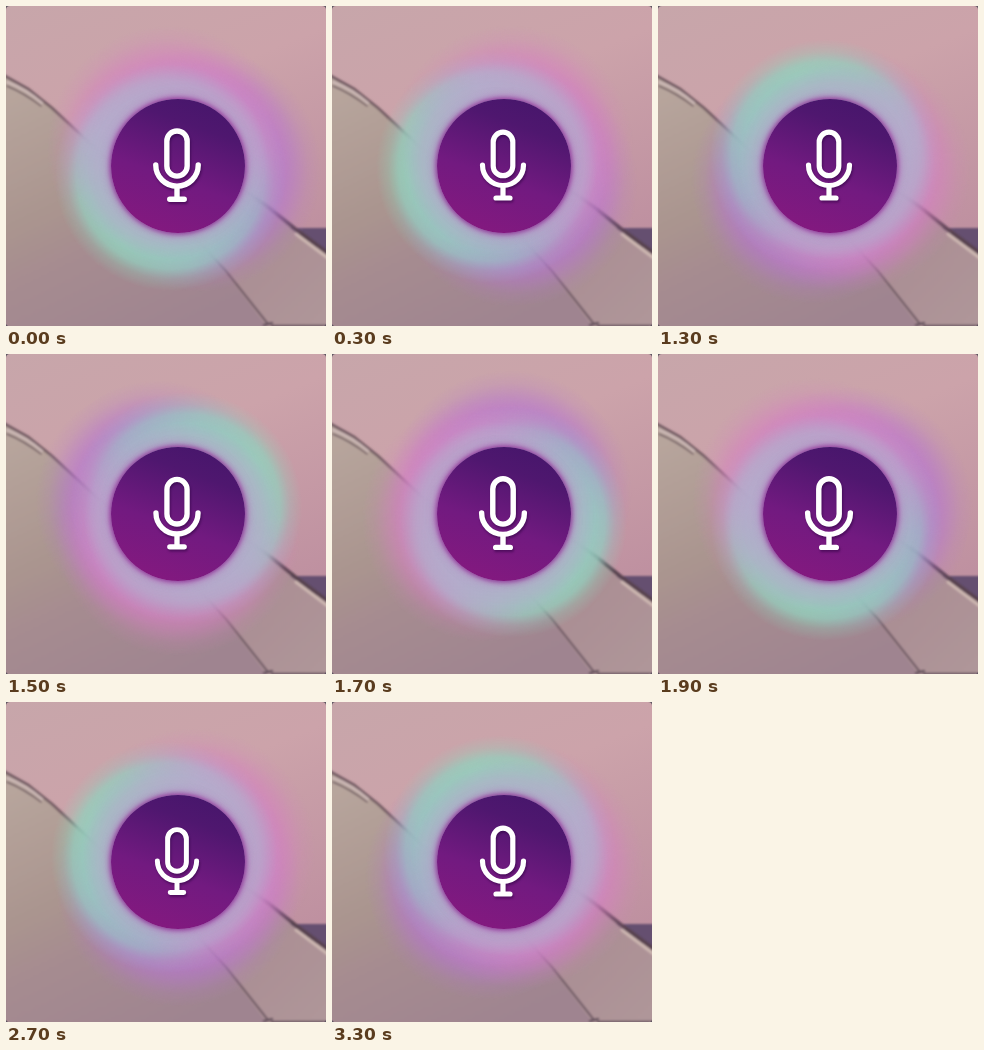
These frames come from a looping animation (320 px wide and 320 px high, 3400 ms). An HTML page:

```html
<!DOCTYPE html>
<html lang="en">
<head>
<meta charset="utf-8">
<title>Voice button</title>
<style>
  html, body { margin: 0; width: 100%; height: 100%; overflow: hidden; background: #5d5560; }
  #stage { position: relative; width: 320px; height: 320px; overflow: hidden; border-radius: 4px; }
  #stage > * { position: absolute; }
  svg { left: 0; top: 0; width: 320px; height: 320px; }

  /* Inside the glow the green side points right; the whole group turns. */
  #glow { left: 31px; top: 19.5px; width: 280px; height: 280px; }
  #glow div { position: absolute; inset: 0; }
  .halo {
    background:
      radial-gradient(circle at 130px 157px, rgb(212 128 192 / .72) 84px, rgb(212 128 192 / .5) 95px, rgb(212 128 192 / .17) 109px, rgb(212 128 192 / 0) 122px),
      radial-gradient(circle at 130px 120px, rgb(182 118 206 / .72) 84px, rgb(182 118 206 / .5) 95px, rgb(182 118 206 / .17) 109px, rgb(182 118 206 / 0) 122px);
  }
  .hues {
    background: conic-gradient(from 90deg,
      rgb(145 211 187), rgb(148 206 188) 35deg, rgb(174 180 206 / .9) 82deg,
      rgb(182 172 204 / .65) 130deg, rgb(184 168 206 / .5) 180deg, rgb(172 174 210 / .6) 225deg,
      rgb(153 188 200 / .9) 268deg, rgb(147 205 191) 318deg, rgb(145 211 187));
    --fade: radial-gradient(circle at 151px 140px, rgb(0 0 0 / .86) 84px, rgb(0 0 0 / .74) 94px, rgb(0 0 0 / .3) 104px, transparent 116px);
    -webkit-mask: var(--fade);
    mask: var(--fade);
  }
  .core {
    background: radial-gradient(circle at 141px 148px,
      rgb(179 171 203 / .72) 70px, rgb(179 171 203 / .55) 80px, rgb(179 171 203 / 0) 98px);
  }

  #disc {
    left: 104.5px; top: 92.5px; width: 134px; height: 134px; border-radius: 50%;
    background: linear-gradient(20deg, #84197f 8%, #721a80 42%, #4f176f 75%, #43166a);
    box-shadow: 0 0 4px 1px rgb(130 35 140 / .75), 0 0 9px 2px rgb(175 75 175 / .6);
  }
  #mic {
    transform-box: view-box; transform-origin: 171px 159.5px;
    filter: drop-shadow(1px 2px 1px rgb(40 0 60 / .5));
  }
</style>
</head>
<body>
<div id="stage">
  <svg viewBox="0 0 320 320">
    <defs>
      <linearGradient id="upper" x1="0" y1="0" x2=".4" y2="1">
        <stop offset="0" stop-color="#c7a6aa"/>
        <stop offset=".4" stop-color="#cca3aa"/>
        <stop offset="1" stop-color="#bd8e9f"/>
      </linearGradient>
      <linearGradient id="lower" x1="0" y1=".1" x2=".55" y2="1">
        <stop offset="0" stop-color="#b7a59c"/>
        <stop offset=".42" stop-color="#aa958f"/>
        <stop offset=".6" stop-color="#a68c90"/>
        <stop offset="1" stop-color="#9f8490"/>
      </linearGradient>
      <linearGradient id="fold" x1="0" y1="0" x2="1" y2="1">
        <stop offset="0" stop-color="#a9878f"/>
        <stop offset="1" stop-color="#b9a29f"/>
      </linearGradient>
      <filter id="soft"><feGaussianBlur stdDeviation=".9"/></filter>
    </defs>
    <rect width="320" height="320" fill="url(#upper)"/>
    <g filter="url(#soft)">
      <path d="M-5 69 L22 84 46 102 100 152 180 166 242 186 325 252 V325 H-5Z" fill="url(#lower)"/>
      <path d="M180 215 L242 186 325 250 V325 H264Z" fill="url(#fold)" opacity=".65"/>
      <path d="M284 222 H325 V245 L310 241Z" fill="#65506f"/>
      <g fill="none" stroke-linecap="round">
        <path d="M-3 69 L22 83 46 102 100 152" stroke="#725a62" stroke-width="2.8"/>
        <path d="M1 76 Q20 83 36 97" stroke="#cbb7b5" stroke-width="2.5"/>
        <path d="M1 80 Q18 87 35 100" stroke="#6f5a60" stroke-width="1.5"/>
        <path d="M290 228 L323 253" stroke="#cdb7b1" stroke-width="3"/>
        <path d="M236 183 L262 201 288 222 323 248" stroke="#59434f" stroke-width="4"/>
        <path d="M188 230 L220 265 262 318" stroke="#735d68" stroke-width="2.2"/>
        <path d="M258 319 L266 317 M266 320 H323" stroke="#675460" stroke-width="2.5"/>
      </g>
    </g>
  </svg>

  <div id="glow"><div class="halo"></div><div class="hues"></div><div class="core"></div></div>
  <div id="disc"></div>

  <svg viewBox="0 0 320 320">
    <g id="mic" fill="none" stroke="#fff" stroke-width="5.2" stroke-linecap="round">
      <rect x="161.2" y="126.2" width="19.6" height="43.5" rx="9.8"/>
      <path d="M150.5 159 A20.5 20.5 0 0 0 191.5 159 M171 180 V192 M164 192 H178"/>
    </g>
  </svg>
</div>
<script>
  const LOOP = 3400, TICK = 100, CYCLE = 2000;
  const byId = id => document.getElementById(id);
  const mic = byId('mic');

  const spin = byId('glow').animate(
    [{ transform: 'rotate(212deg)' }, { transform: 'rotate(572deg)' }],
    { duration: CYCLE, easing: 'ease', fill: 'both' });
  spin.pause();

  function draw(now) {
    const t = Math.floor((now % LOOP) / TICK) * TICK;
    spin.currentTime = (t + 920) % CYCLE;
    const pulse = 1 + 0.045 * Math.cos(2 * Math.PI * (t - 1800) / CYCLE);
    mic.style.transform = `scale(${pulse})`;
  }

  const start = performance.now();
  function frame() {
    draw(performance.now() - start);
    requestAnimationFrame(frame);
  }
  frame();
</script>
</body>
</html>
```
